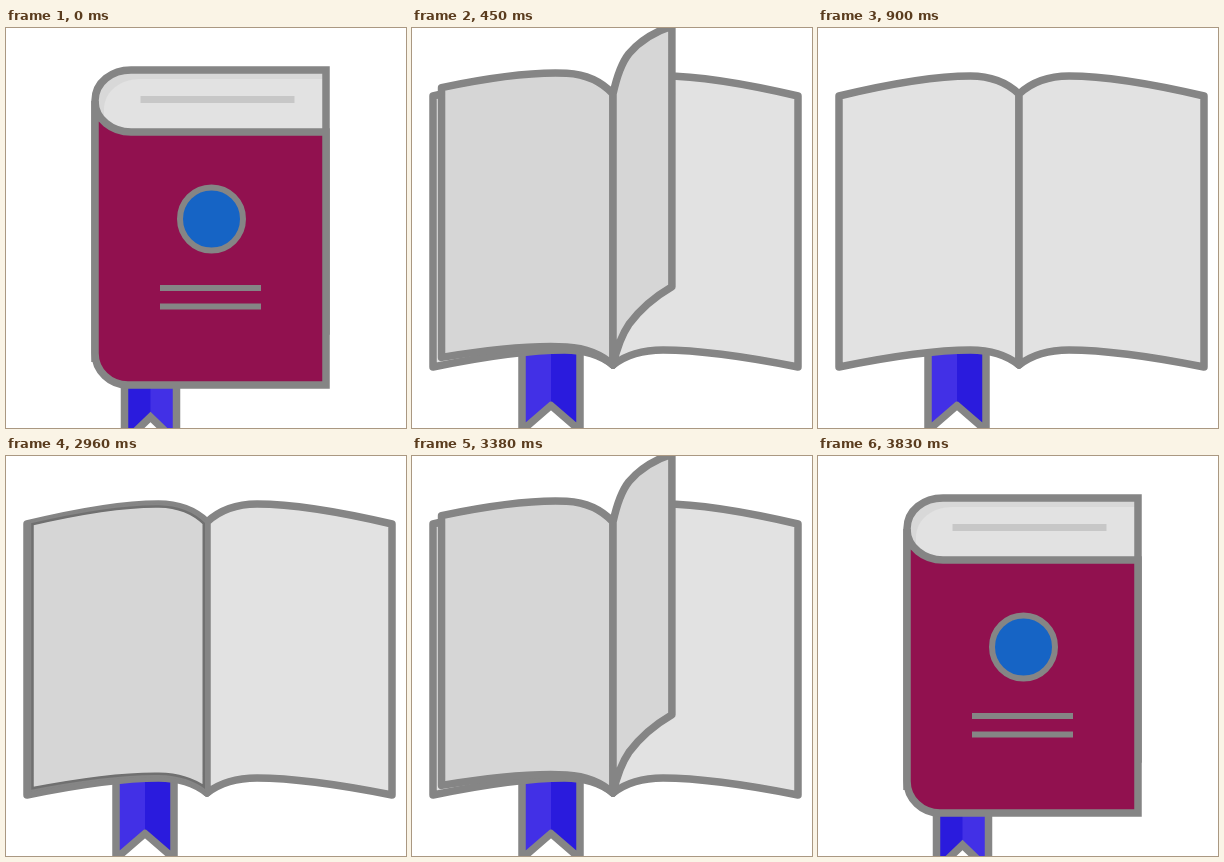
Recreate the animation shown at these times as an HTML page with a canvas. Size 400 by 400 pixels, loop 4.86 s.

```html
<!DOCTYPE html>
<html lang="en">
<head>
<meta charset="utf-8">
<title>Book</title>
<style>
  html, body { margin: 0; width: 100%; height: 100%; overflow: hidden; background: #fff; }
  canvas { display: block; width: 400px; height: 400px; }
</style>
</head>
<body>
<canvas id="stage" width="400" height="400"></canvas>
<script>
const ctx = document.getElementById('stage').getContext('2d');

const LOOP = 4860, STEP = 30, OPEN_TIME = 360, END = 900, CLOSE_AT = 2960, CLOSED_AT = 3830;
const LINE = '#858585', PAPER = '#e2e2e2', SHADE = '#d6d6d6';

// The right page and the ribbon when closed, half open and open.
const PAGE = [
  { spine: 89, spineY: 73, crest: 125, crestY: 42, edge: 320, edgeY: 42, height: 260, flare: 0 },
  { spine: 145, spineY: 68, crest: 190, crestY: 44, edge: 352, edgeY: 51, height: 268, flare: .14 },
  { spine: 201, spineY: 66, crest: 251, crestY: 48, edge: 386, edgeY: 68, height: 270, flare: .24 }
];
const RIBBON = [
  { x: 144.5, half: 26, top: 350, notch: 389 },
  { x: 156.5, half: 7, top: 350, notch: 386 },
  { x: 139, half: -29, top: 318, notch: 377.5 }
];
// Start and end of each page turn.
const TURNS = [[210, 476], [290, 690], [490, 890]];

const mix = (a, b, k) => a + (b - a) * k;
const ease = u => (1 - Math.cos(Math.PI * u)) / 2;

function pose(keys, p) {
  const i = p <= .5 ? 0 : 1, mixed = {};
  for (const name in keys[i]) mixed[name] = mix(keys[i][name], keys[i + 1][name], p * 2 - i);
  return mixed;
}

function paint(path, fill, stroke = LINE, width = 7.5) {
  if (fill) {
    ctx.fillStyle = fill;
    ctx.fill(path);
  }
  if (stroke) {
    ctx.strokeStyle = stroke;
    ctx.lineWidth = width;
    ctx.stroke(path);
  }
}

function polygon(...points) {
  const path = new Path2D();
  points.forEach(([x, y]) => path.lineTo(x, y));
  path.closePath();
  return path;
}

function rule(x1, y1, x2, y2, color, width) {
  paint(polygon([x1, y1], [x2, y2]), null, color, width);
}

// Upper or lower rim of a page: spine, crest, edge and the controls between them.
function rim(page, drop, crestDrop) {
  const { spine, crest, edge, flare } = page;
  const spineY = page.spineY + drop, crestY = page.crestY + crestDrop, edgeY = page.edgeY + drop;
  const hump = crest - spine, slope = edge - crest;
  return [
    [spine, spineY],
    [spine + flare * hump, mix(spineY, crestY, .62)],
    [spine + (.48 + flare * .5) * hump, crestY],
    [crest, crestY],
    [crest + .3 * slope, crestY],
    [crest + .67 * slope, mix(crestY, edgeY, .48)],
    [edge, edgeY]
  ];
}

// A page swung to the given signed width, its outer edge raised by lift.
function sheet(page, width = page.edge - page.spine, lift = 0) {
  const full = page.edge - page.spine;
  const swing = raise => ([x, y]) => {
    const reach = (x - page.spine) / full;
    return [page.spine + width * reach, y - raise * reach ** .87];
  };
  const top = rim(page, 0, 0).map(swing(lift * .87));
  const bottom = rim(page, page.height + 1, page.height + 4).map(swing(lift)).reverse();
  const path = new Path2D();
  for (const points of [top, bottom]) {
    path.lineTo(...points[0]);
    path.bezierCurveTo(...points.slice(1, 4).flat());
    path.bezierCurveTo(...points.slice(4).flat());
  }
  path.closePath();
  return path;
}

function drawRibbon(p) {
  const { x, half, top, notch } = pose(RIBBON, p);
  const left = x - half, right = x + half, tip = notch + 25;
  const whole = polygon([left, top], [right, top], [right, tip], [x, notch], [left, tip]);
  paint(whole, '#4230e6', null);
  paint(polygon([left, top], [x, top], [x, notch], [left, tip]), '#2a1bdd', null);
  paint(whole);
}

function drawRightPage(p, page) {
  const path = sheet(page);
  ctx.save();
  ctx.clip(path);
  paint(path, '#d8d8d8', null);
  const fade = Math.min(1, 2 - 2 * p);
  ctx.translate((9 + 14 * p) * fade, 9 * fade);
  paint(path, PAPER, null);
  ctx.restore();
  paint(path);
  if (p < .5) {
    ctx.globalAlpha = 1 - p * 2;
    rule(134.5, 71.5, 288.5, 71.5, '#c7c7c7', 7);
    ctx.globalAlpha = 1;
  }
}

// Front cover, from facing us (k = 0) to nearly edge-on (k = 1).
function drawCover(k, spine) {
  const m = (a, b) => mix(a, b, k);
  const edge = m(320, 169), top = m(104, 103), bulge = spine - 8 * k;
  const path = new Path2D();
  path.moveTo(edge, top);
  path.lineTo(spine + m(36, 13), top - 2 * k);
  path.bezierCurveTo(spine + m(17, 1), m(104, 99), bulge, m(91, 95), bulge, m(73, 85));
  path.quadraticCurveTo(bulge, m(80, 72), spine, m(90, 64));
  path.lineTo(spine, m(325, 330));
  path.bezierCurveTo(bulge, m(343, 336), spine + m(15, -7), m(357, 350), spine + m(33, 2), m(357, 355));
  path.lineTo(edge, m(357, 370));
  path.closePath();
  paint(path, '#91114f');

  const badge = new Path2D();
  badge.ellipse(m(205.5, 164), m(191, 185), m(31.5, 3), m(31.5, 33), 0, 0, 7);
  paint(badge, '#1664c5', LINE, m(6, 2));
  for (const y of [260, 278.5])
    rule(m(154, 159), y - 14 * k, m(255, 166), y - 6 * k, LINE, m(6, 3));
}

function drawTurns(time, page) {
  for (const [start, end] of TURNS) {
    const u = (time - start) / (end - start);
    if (u <= 0 || u >= 1) continue;
    const width = mix(page.edge - page.spine, -180, ease(u));
    const path = sheet(page, width, 88 * Math.sin(Math.PI * u) ** 1.85);
    if (u < .93) {
      paint(path, SHADE);
      continue;
    }
    // A settling page shows a dark inner rim.
    ctx.save();
    ctx.clip(path);
    paint(path, SHADE, '#707070', 9);
    paint(path, null, LINE, 4);
    ctx.restore();
  }
}

function draw(time) {
  const p = ease(Math.min(1, time / OPEN_TIME));
  const facing = p < .501;
  const page = pose(PAGE, p);

  ctx.fillStyle = '#fff';
  ctx.fillRect(0, 0, 400, 400);
  ctx.lineCap = 'round';
  ctx.lineJoin = p ? 'round' : 'miter';

  drawRibbon(p);
  if (!facing) paint(sheet(page, mix(24, -180, p * 2 - 1), -66 * (1 - p)), PAPER);
  drawRightPage(p, page);
  if (facing) drawCover(p * 2, page.spine);
  drawTurns(time, page);
}

// Opening, rest, the same movement backwards, rest.
function bookTime(t) {
  if (t < END) return Math.floor(t / STEP) * STEP;
  if (t < CLOSE_AT) return END;
  if (t >= CLOSED_AT) return 0;
  return END - STEP - Math.floor((t - CLOSE_AT) / STEP) * STEP;
}

const begin = performance.now();
function tick() {
  draw(bookTime((performance.now() - begin) % LOOP));
  requestAnimationFrame(tick);
}
tick();
</script>
</body>
</html>
```
